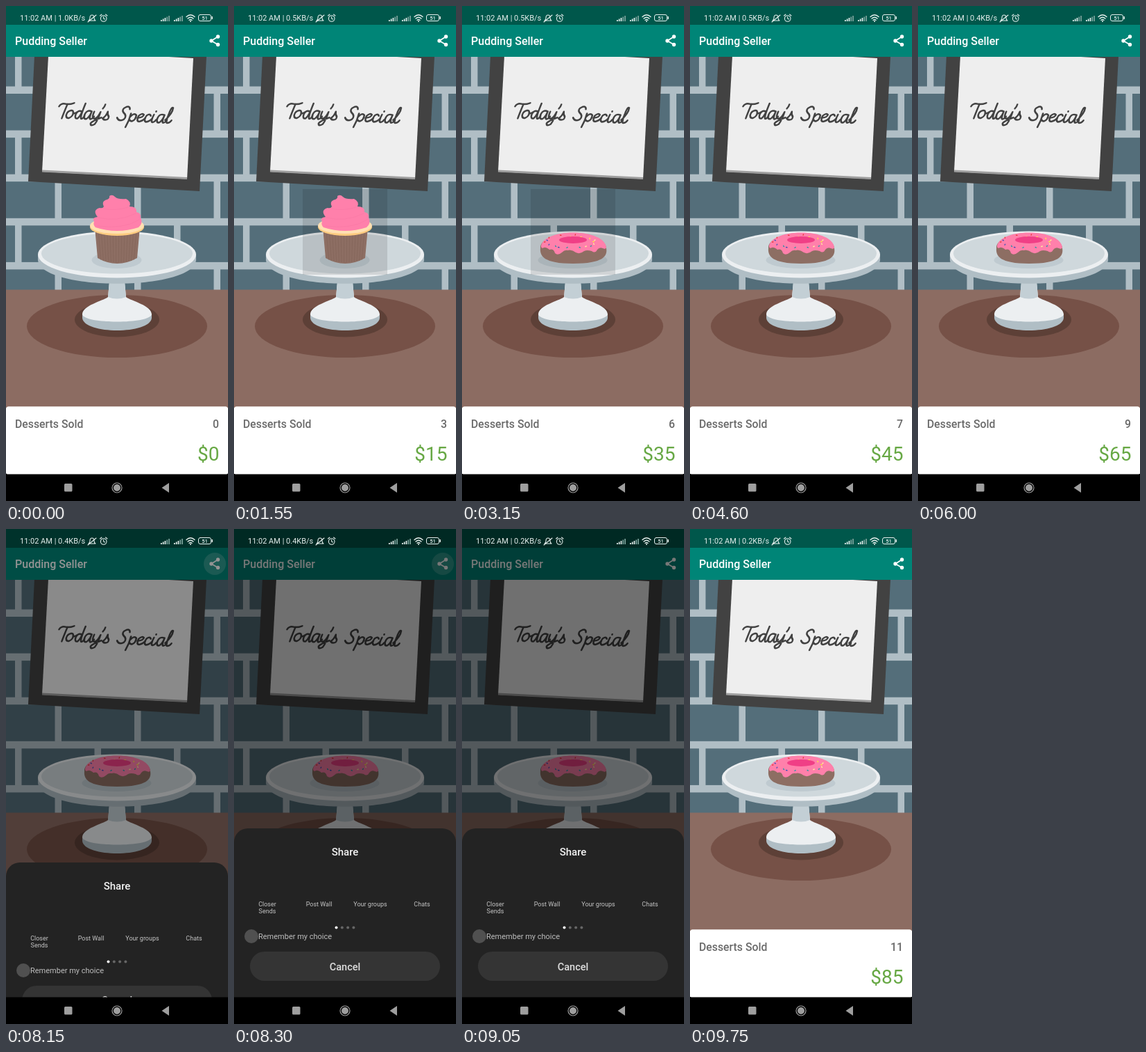
Write an HTML page with a canvas that moves like this. It is 320 by 711 pixels and loops after 9.8 s.

```html
<!DOCTYPE html>
<html lang="en">
<head>
<meta charset="utf-8">
<title>Pudding Seller</title>
<style>
html, body { margin: 0; width: 100%; height: 100%; overflow: hidden; background: #000; }
canvas { display: block; width: 320px; height: 711px; }
</style>
</head>
<body>
<canvas id="stage"></canvas>
<script>
const LOOP = 9800, TAU = Math.PI * 2;
const canvas = document.getElementById('stage');
const ctx = canvas.getContext('2d');
const ratio = window.devicePixelRatio || 1;
canvas.width = Math.round(320 * ratio);
canvas.height = Math.round(711 * ratio);

const TAPS = [400, 930, 1460, 2000, 2530, 3060, 3700, 4800, 5450, 6100, 6750];
const CUPCAKES = 5;

const clamp = v => Math.max(0, Math.min(1, v));
const ramp = (t, from, to) => clamp((t - from) / (to - from));
const easeOut = p => 1 - (1 - p) ** 3;

function rect(x, y, w, h, color) {
  ctx.fillStyle = color;
  ctx.fillRect(x, y, w, h);
}
function oval(x, y, rx, ry, color) {
  ctx.fillStyle = color;
  ctx.beginPath();
  ctx.ellipse(x, y, rx, ry, 0, 0, TAU);
  ctx.fill();
}
const dot = (x, y, r, color) => oval(x, y, r, r, color);
function shape(path, color) {
  ctx.fillStyle = color;
  ctx.fill(new Path2D(path));
}
function line(path, color, width) {
  ctx.strokeStyle = color;
  ctx.lineWidth = width;
  ctx.lineCap = ctx.lineJoin = 'round';
  ctx.stroke(new Path2D(path));
}
function round(x, y, w, h, r, color) {
  ctx.fillStyle = color;
  ctx.beginPath();
  ctx.roundRect(x, y, w, h, r);
  ctx.fill();
}
function label(text, x, y, size, color, align = 'left', weight = 400) {
  ctx.font = `${weight} ${size}px Roboto, sans-serif`;
  ctx.textAlign = align;
  ctx.fillStyle = color;
  ctx.fillText(text, x, y);
}

function drawWall() {
  const mortar = '#b0bec5';
  rect(0, 72, 320, 337, '#546e7a');
  for (let row = 0; row < 6; row++) {
    const y = 115.5 + row * 63.1;
    if (row < 5) rect(0, y, 320, 10.5, mortar);
    for (let x = row % 2 ? 70.5 : 13; x < 320; x += 114.5) {
      rect(x, Math.max(72, y - 53), 9.5, 54, mortar);
    }
  }
}

const GLYPHS = {
  T: 'M0-16Q2-21 8-20T20-22M11-20Q9-8 8 1',
  o: 'M6-11Q0-10 0-4Q1 1 5 0Q10-3 9-8Q8-12 5-11M9-8Q11-6 14-9',
  d: 'M9-10Q2-13 1-5Q1 1 5 0Q9-4 11-22Q8-3 10 0Q12 1 14-4',
  a: 'M10-11Q2-14 1-5Q1 1 5 0Q9-3 10-11Q8 0 11 0Q13 0 15-4',
  y: 'M1-11Q-1-1 4-1Q8-2 10-11Q9 2 6 7Q1 11 0 6Q2 2 13-3',
  "'": 'M1-22Q1-19-1-16',
  s: 'M0-2Q4-5 5-12Q5-8 8-5Q9 0 4 0Q1 0 1-2',
  S: 'M14-17Q13-22 8-20Q2-17 6-12Q13-7 9-2Q3 2-1-4',
  p: 'M2-11Q2 0-1 9M2-6Q6-13 10-9Q11-2 6 0Q3 0 2-2',
  e: 'M0-5Q8-6 8-10Q5-13 1-8Q-1 0 4 0Q8-1 11-5',
  c: 'M8-9Q6-13 2-9Q-1-2 3 0Q7 0 11-5',
  i: 'M2-11Q-1 0 3 0Q5 0 7-4M4-16L4-15.5',
  l: 'M0-4Q8-14 7-22Q4-24 3-12Q1 0 4 0Q7 0 9-4'
};
const ADVANCE = { T: 13, o: 12, y: 13, "'": 2, s: 9, ' ': 12, S: 15, e: 10, c: 10, i: 7 };

function drawSign() {
  shape('M41 72L32 252L279 266L289 72Z', '#424242');
  shape('M61 72L52 238L261 248.5L270 75L217 72Z', '#eeeeee');
  shape('M52 235.5L261 246L261 249L52 238.5Z', '#9e9e9e');
  ctx.save();
  ctx.translate(72.5, 160);
  ctx.rotate(0.05);
  ctx.transform(1.02, 0, -0.2, 1, 0, 0);
  for (const letter of "Today's Special") {
    if (GLYPHS[letter]) line(GLYPHS[letter], '#424242', 2.5);
    ctx.translate(ADVANCE[letter] || 12.5, 0);
  }
  ctx.restore();
}

function drawStand() {
  rect(0, 407.5, 320, 170, '#8c6c62');
  oval(160, 460, 130, 45, '#765147');
  oval(160, 450.5, 61, 25, '#5d4037');

  shape('M110 442V448C112 472 208 472 210 448V442Z', '#b0bec5');
  shape('M149 396L147 418C139 424 110 430 110 443C113 457 207 457 210 443C210 430 181 424 173 418L171 396Z', '#eceff1');
  shape('M149 396L147 418Q160 423 173 418L171 396Z', '#c3cfd5');

  shape('M46 357V365C50 410 270 410 274 365V357Z', '#b0bec5');
  oval(160, 357, 114, 33.5, '#eceff1');
  oval(160, 355.5, 109, 29, '#cfd8dc');
}

function drawCupcake() {
  shape('M128 318L132 362Q160 378 189 362L193 318Z', '#8d6e63');
  for (let i = 1; i < 15; i++) {
    const u = i / 15;
    line(`M${129 + 63 * u} 325L${133 + 55 * u} ${363 + 20 * u * (1 - u)}`, '#83655a', 0.7);
  }
  oval(160, 317.5, 39, 12.5, '#ffcc80');
  oval(160, 315.5, 39, 11.5, '#ffe0b2');
  shape('M127 310Q123 304 132 303Q124 293 135 290Q140 291 141 288Q137 280 146 278Q150 276 149 273' +
    'Q153 270 157 274Q161 278 173 277Q181 281 178 288Q189 288 188 296Q195 297 194 304' +
    'Q198 312 191 318Q160 328 129 318Q125 314 127 310Z', '#ff80ab');
  line('M140 291Q157 295 176 289M133 304Q160 311 187 298M132 316Q170 321 192 307', '#f979a5', 0.7);
}

function drawDonut() {
  shape('M113 348C112 336 133 326 160 326C187 326 208 336 208 348C210 359 204 370 160 370C118 370 112 359 113 348Z', '#8d6e63');
  shape('M114 346C114 334 134 325.5 160 325.5C187 325.5 207 334 208 347Q207 350 203 348Q198 346 195 350' +
    'Q192 356 187 352Q180 350 176 352Q170 357 164 354Q158 349 152 351Q148 350 144 354' +
    'Q138 359 134 355Q132 348 126 350Q121 346 118 347Q115 349 114 346Z', '#ff80ab');
  const colors = ['#ffeb3b', '#2196a6', '#e53935', '#fff59d', '#3f51b5'];
  for (let i = 0; i < 18; i++) {
    const a = i * 2.4, r = 0.72 + 0.28 * ((i * 7) % 5) / 4;
    const x = 160 + Math.cos(a) * 40 * r, y = 338.5 + Math.sin(a) * 10.5 * r;
    line(`M${x} ${y}l${Math.cos(a * 3) * 1.4} ${Math.sin(a * 3) * 1.1}`, colors[i % 5], 1.4);
  }
  oval(160, 336, 20, 5, '#f03f86');
}

// The press highlight lies between the stand and the dessert.
function drawTap(t) {
  for (const tap of TAPS) {
    const age = t - tap;
    if (age < -90 || age > 260) continue;
    const strength = ramp(age, -90, -20) * (1 - ramp(age, 80, 260));
    ctx.save();
    ctx.beginPath();
    ctx.rect(99, 263, 122, 123);
    ctx.clip();
    rect(99, 263, 122, 123, `rgba(0,0,0,${0.08 * strength})`);
    dot(160, 324, 30 + 60 * easeOut(ramp(age, -90, 135)), `rgba(0,0,0,${0.04 * strength})`);
    ctx.restore();
  }
}

function drawDessert(t, sold) {
  const cupcake = sold < CUPCAKES;
  oval(159.5, 365, cupcake ? 36 : 50, 12, '#bfcad0');
  drawTap(t);
  if (cupcake) drawCupcake(); else drawDonut();
}

function drawCard(sold) {
  const money = 5 * Math.min(sold, CUPCAKES) + 10 * Math.max(0, sold - CUPCAKES);
  round(0, 575.3, 320, 98, 4, '#ffffff');
  label('Desserts Sold', 13, 606, 15.8, '#6a6a6a', 'left', 500);
  label(sold, 307, 606, 15.8, '#6a6a6a', 'right', 500);
  label('$' + money, 307.5, 652.6, 28, '#67a844', 'right');
}

function drawAppBar(t) {
  rect(0, 0, 320, 27, '#00574b');
  rect(0, 27, 320, 46, '#008577');
  label('Pudding Seller', 13, 56, 16, '#ffffff', 'left', 500);
  const press = ramp(t, 8000, 8080) * (1 - ramp(t, 8350, 8600));
  if (press) dot(301, 50, 16, `rgba(255,255,255,${0.18 * press})`);
  line('M305.5 44L296 50L305.5 55.5', '#fff', 1.7);
  for (const [x, y] of [[305.5, 44], [296, 50], [305.5, 55.5]]) dot(x, y, 2.7, '#fff');
}

function drawSheet(t) {
  const shown = easeOut(ramp(t, 8060, 8280)) * (1 - ramp(t, 9250, 9470) ** 2);
  if (!shown) return;
  rect(0, 0, 320, 711, `rgba(0,0,0,${0.53 * shown})`);
  ctx.save();
  ctx.translate(0, 243 * (1 - shown));
  round(0, 430, 320, 245, [20, 20, 0, 0], '#232323');
  label('Share', 160, 469, 15, '#f2f2f2', 'center', 500);
  [['Closer', 48, 542], ['Sends', 48, 552], ['Post Wall', 122.5, 542],
    ['Your groups', 196.5, 542], ['Chats', 271, 542]]
    .forEach(([text, x, y]) => label(text, x, y, 9, '#c4c4c4', 'center'));
  for (let i = 0; i < 4; i++) dot(147.5 + i * 8.3, 572.5, 2, i ? '#666' : '#fff');
  dot(25, 585, 10, '#505050');
  label('Remember my choice', 35, 589, 11, '#bdbdbd');
  round(23, 607, 274, 42, 21, '#343434');
  label('Cancel', 160, 633.5, 14.5, '#dedede', 'center', 500);
  ctx.restore();
}

function drawStatus(t) {
  const white = '#e6efed';
  const speed = t < 1000 ? '1.0' : t < 5000 ? '0.5' : t < 9000 ? '0.4' : '0.2';
  label(`11:02 AM | ${speed}KB/s`, 20, 21, 11, white);

  line('M119 21Q121 20 121 17Q121 13 124 13Q127 13 127 17Q127 20 129 21ZM118 23L130 13', white, 1.1);
  line('M145 18A4.3 4.3 0 1 1 136.4 18A4.3 4.3 0 1 1 145 18M140.7 15.5V18L142.5 19M135.5 14L138 12M146 14L143.5 12', white, 1.1);
  for (const x of [223, 242]) {
    for (let i = 0; i < 5; i++) {
      rect(x + i * 2.8, 20 - i * 1.5, 1.7, 2 + i * 1.5, i < 3 ? white : '#7da39d');
    }
  }
  line('M260 15.5Q266 10 272 15.5M262 18Q266 14.5 270 18M264 20.3Q266 18.8 268 20.3', white, 1.4);
  dot(266, 22, 1, white);
  ctx.strokeStyle = white;
  ctx.lineWidth = 1;
  ctx.beginPath();
  ctx.roundRect(277.5, 12.5, 18, 9, 2.5);
  ctx.stroke();
  rect(296.5, 15, 1.5, 4, white);
  label('51', 286.5, 20, 7.5, white, 'center', 500);
}

function drawNavigation() {
  rect(0, 672.5, 320, 39, '#000');
  round(84, 686, 11.5, 11.5, 1.5, '#9e9e9e');
  line('M167 692A7 7 0 1 1 153 692A7 7 0 1 1 167 692', '#9e9e9e', 1.2);
  dot(160, 692, 5, '#9e9e9e');
  shape('M224.5 692L235 685V699Z', '#9e9e9e');
}

function render(now) {
  const t = now % LOOP;
  const sold = TAPS.filter(tap => tap <= t).length;
  ctx.setTransform(ratio, 0, 0, ratio, 0, 0);
  drawWall();
  drawSign();
  drawStand();
  drawDessert(t, sold);
  drawCard(sold);
  drawAppBar(t);
  drawSheet(t);
  drawStatus(t);
  drawNavigation();
}

const start = performance.now();
function tick() {
  render(performance.now() - start);
  requestAnimationFrame(tick);
}
tick();
</script>
</body>
</html>
```
